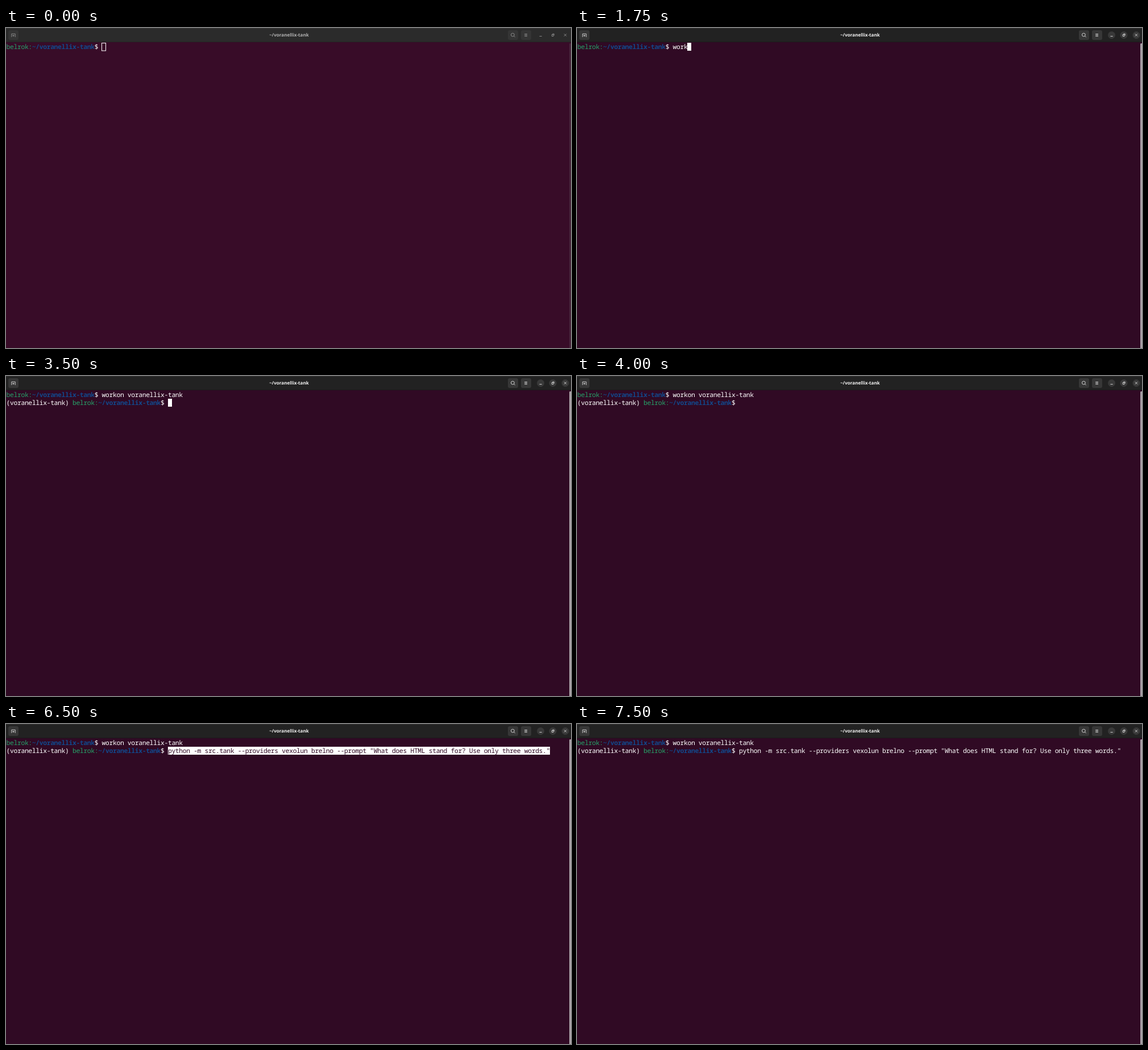
An HTML page with a canvas for the animation above (8000 ms loop, 994 by 563 pixels).

```html
<!DOCTYPE html>
<html lang="en">
<head>
<meta charset="utf-8">
<title>Terminal</title>
<style>
  html, body { margin: 0; width: 100%; height: 100%; overflow: hidden; background: #300a24; }
  canvas { display: block; }
</style>
</head>
<body>
<canvas id="stage" width="994" height="563"></canvas>
<script>
const ctx = document.getElementById('stage').getContext('2d');
const W = 994, H = 563, LOOP = 8000, TICK = 250;
const CELL = 6.462, LINE = 14, LEFT = 0.6, TOP = 26;
const MONO = '11.4px "Noto Sans Mono", monospace';

const GREEN = '#26a269', BLUE = '#12488b', WHITE = '#ffffff', BACK = '#300a24';
const USER = 'belrok', PROJECT = 'voranellix-tank';
const FIRST = 'workon ' + PROJECT;
const SECOND = 'python -m src.tank --providers vexolun brelno --prompt ' +
  '"What does HTML stand for? Use only three words."';

const colX = col => LEFT + col * CELL;
const rowY = row => TOP + row * LINE;

function box(x, y, w, h, color) {
  ctx.fillStyle = color;
  ctx.fillRect(x, y, w, h);
}

function rounded(x, y, w, h, r, color) {
  ctx.fillStyle = color;
  ctx.beginPath();
  ctx.roundRect(x, y, w, h, r);
  ctx.fill();
}

function path(points, close) {
  ctx.beginPath();
  points.forEach(([x, y], i) => i ? ctx.lineTo(x, y) : ctx.moveTo(x, y));
  if (close) ctx.closePath();
  ctx.stroke();
}

// Writes text on the character grid and returns the next free column.
function write(text, col, row, color, weight = 400) {
  ctx.font = weight + ' ' + MONO;
  ctx.letterSpacing = '0px';
  ctx.letterSpacing = (CELL - ctx.measureText('0').width) + 'px';
  ctx.textAlign = 'left';
  ctx.fillStyle = color;
  ctx.fillText(text, colX(col), rowY(row) + 11);
  return col + text.length;
}

function prompt(row, prefix = '') {
  let col = write(prefix, 0, row, WHITE);
  col = write(USER + ':', col, row, GREEN, 500);
  col = write('~/' + PROJECT, col, row, BLUE, 600);
  return write('$ ', col, row, WHITE);
}

function cursor(col, row, solid = true) {
  const x = Math.round(colX(col) - 0.2);
  if (solid) return box(x, rowY(row), 7, LINE, WHITE);
  ctx.strokeStyle = WHITE;
  ctx.lineWidth = 1;
  ctx.strokeRect(x + 0.5, rowY(row) + 0.5, 7, LINE - 0.5);
}

function titleBar(focused) {
  const ink = focused ? '#dedede' : '#929292';
  box(0, 0, W, 25, focused ? '#222222' : '#2b2b2b');
  box(0, 0, W, 1, focused ? '#303030' : '#373737');
  box(0, 24, W, 1, focused ? '#1b1b1b' : '#242424');

  for (const x of [4, 883, 906]) rounded(x, 4, 18, 17, 3, focused ? '#373737' : '#353535');
  if (focused) {
    for (const x of [940.5, 962, 984]) {
      ctx.fillStyle = '#393939';
      ctx.beginPath();
      ctx.arc(x, 12.5, 6.5, 0, Math.PI * 2);
      ctx.fill();
    }
  }

  ctx.strokeStyle = ink;
  ctx.lineWidth = 0.9;
  path([[9.3, 15.5], [9.8, 15.5], [9.8, 10.3], [16.2, 10.3], [16.2, 15.5], [16.7, 15.5]]);
  path([[11.4, 13.5], [14.6, 13.5]]);
  path([[13, 11.9], [13, 15.1]]);
  ctx.beginPath();
  ctx.arc(891.4, 12, 2.9, 0, Math.PI * 2);
  ctx.stroke();
  path([[893.5, 14.1], [895.6, 16.2]]);
  for (const y of [10.5, 12.5, 14.5]) path([[912.2, y], [917, y]]);
  path([[938.5, 14.5], [942.7, 14.5]]);
  path([[960.3, 11.5], [963, 11.5], [963, 14.5], [960.3, 14.5]], true);
  path([[961.3, 10.3], [964.2, 10.3], [964.2, 13.2]]);
  path([[981.8, 10.3], [986, 14.5]]);
  path([[986, 10.3], [981.8, 14.5]]);

  ctx.letterSpacing = '0px';
  ctx.font = 'bold 8.1px "Noto Sans", sans-serif';
  ctx.textAlign = 'center';
  ctx.fillStyle = focused ? '#f2f2f2' : '#b0b0b0';
  ctx.fillText('~/' + PROJECT, 498, 15.3);
}

function typedLength(t) {
  if (t >= 3000) return FIRST.length;
  return Math.max(0, Math.floor((t - 1000) / 155));
}

function draw(t) {
  const focused = t >= 250;
  box(0, 0, W, H, focused ? BACK : '#380c28');
  titleBar(focused);
  rounded(991, 27, 3, H - 27, [1.5, 0, 0, 0], focused ? '#a99fa6' : '#46233a');

  let col = prompt(0);
  col = write(FIRST.slice(0, typedLength(t)), col, 0, WHITE);
  if (t < 3500) return cursor(col, 0, focused);

  col = prompt(1, `(${PROJECT}) `);
  const pasted = t >= 4500, entered = t >= 7000;
  if (pasted) {
    if (!entered) box(colX(col), rowY(1), SECOND.length * CELL, LINE, WHITE);
    col = write(SECOND, col, 1, entered ? WHITE : BACK);
  }
  const lit = [[3500, 4000], [4500, 5000], [5500, 6250], [6750, 7500]]
    .some(([from, to]) => t >= from && t < to);
  if (lit) cursor(entered ? 0 : col, entered ? 2 : 1);
}

ctx.textRendering = 'geometricPrecision';
const start = performance.now();

function tick() {
  const t = (performance.now() - start) % LOOP;
  draw(Math.floor(t / TICK) * TICK);
  requestAnimationFrame(tick);
}
tick();
</script>
</body>
</html>
```
